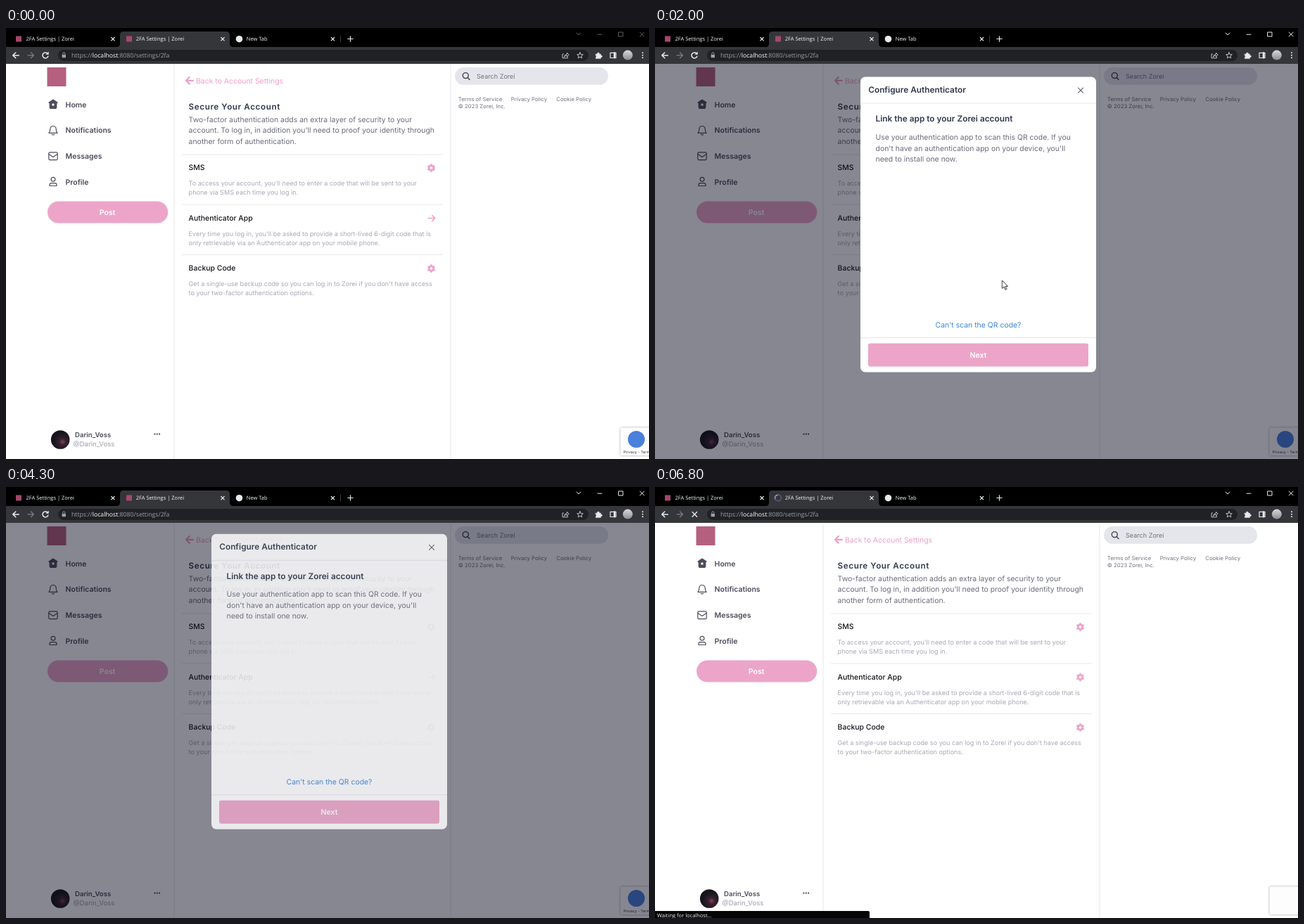
An HTML page for the animation above (6900 ms loop, 914x613 px).

```html
<!DOCTYPE html>
<html lang="en">
<head>
<meta charset="utf-8">
<title>2FA Settings</title>
<style>
html, body { margin: 0; width: 100%; height: 100%; overflow: hidden; background: #fff; }
svg { display: block; }
text { font: 400 10.44px Inter, sans-serif; fill: #6a6b7b; text-rendering: geometricPrecision; }
.ui { font: 400 7.5px "Open Sans", sans-serif; fill: #f4f5f7; }
.url { font-size: 8.72px; fill: #9aa0a6; }
.url tspan { fill: #fff; }
.head { font-size: 11.85px; font-weight: 600; fill: #30384c; }
.nav { font-size: 10.5px; font-weight: 600; fill: #4c4c5c; }
.row { font-weight: 500; fill: #15151d; }
.small { font-size: 9.08px; fill: #a7a7b6; }
.tiny { font-size: 7.75px; fill: #717180; }
.btn { font-size: 10.6px; font-weight: 600; fill: #fff; text-anchor: middle; }
.link { fill: #3b86dc; }
.line { fill: none; stroke: #e8e8ed; }
.icon { fill: none; stroke-linecap: round; stroke-linejoin: round; }
.pink { fill: #eca5c9; }
.pinkline { stroke: #eca0c6; }
.slate { stroke: #4c4c5c; stroke-width: 1.2; }
.chrome { stroke: #e8eaed; stroke-width: 1.2; }
.anim { opacity: 0; }
.spin { transform-box: fill-box; transform-origin: center; animation: spin .69s steps(7) infinite; }
@keyframes spin { to { transform: rotate(360deg); } }
</style>
</head>
<body>
<svg width="914" height="613" viewBox="0 0 914 613">
<defs>
  <radialGradient id="dark" cx=".62" cy=".62"><stop offset="0" stop-color="#8a3f4c"/><stop offset=".35" stop-color="#34222e"/><stop offset="1" stop-color="#15131c"/></radialGradient>
  <linearGradient id="pale" x2="0" y2="1"><stop stop-color="#d8d8da"/><stop offset="1" stop-color="#8f8c92"/></linearGradient>
  <filter id="shadow" x="-20%" y="-20%" width="140%" height="140%"><feDropShadow dx="0" dy="0" stdDeviation="1.8" flood-color="#777" flood-opacity=".8"/></filter>
  <g id="gear" fill="none" stroke="#eca0c6">
    <circle r="3.2" stroke-width="2.6"/>
    <circle r="4.8" stroke-width="2" pathLength="12" stroke-dasharray="1" stroke-dashoffset="1.5"/>
  </g>
  <path id="x" d="M-2.2-2.2 2.2 2.2M2.2-2.2-2.2 2.2"/>
  <g id="bar">
    <text class="head" x="303.2" y="92">Configure Authenticator</text>
    <path class="icon" d="M601.5 85.2l7 7m0-7l-7 7" stroke="#62636f" stroke-width="1.1"/>
    <path class="line" d="M292 107H627"/>
  </g>
</defs>

<!-- page -->
<rect y="51" width="914" height="562" fill="#fff"/>
<path class="line" d="M239 51V613M632 51V613" style="stroke:#eeeef2" stroke-width="1.4"/>
<rect x="58.5" y="56" width="27" height="27" fill="#b5607f"/>
<g class="icon slate">
  <path d="M61 106l6-4 6 4-1.2 1.2v5.6q0 1.6-1.6 1.6h-6.4q-1.6 0-1.6-1.6v-5.6z" fill="#4c4c5c"/>
  <circle cx="67" cy="109" r="1.8" fill="#fff" stroke="none"/>
  <path d="M61 149.3q1.8-1.6 1.8-5.6a4.2 4.2 0 0 1 8.4 0q0 4 1.8 5.6zM65.3 151.3q1.7 1.4 3.4 0"/>
  <rect x="60.8" y="176.8" width="12.4" height="10.8" rx="1.6"/><path d="M61 179.5l6 4 6-4"/>
  <circle cx="67" cy="215.3" r="2.9"/><path d="M62 224.5v-1.2q0-2.6 2.6-2.6h4.8q2.6 0 2.6 2.6v1.2z"/>
</g>
<text class="nav" x="84.6" y="112.8">Home</text>
<text class="nav" x="84.6" y="149.4">Notifications</text>
<text class="nav" x="84.6" y="186.1">Messages</text>
<text class="nav" x="84.6" y="222.7">Profile</text>
<rect class="pink" x="59" y="246.4" width="171.3" height="31.2" rx="15.6"/>
<text class="btn" x="144.2" y="265.9">Post</text>
<circle cx="77.2" cy="585.5" r="13.3" fill="url(#dark)"/>
<text class="nav" x="98" y="582.2" style="font-size:9.6px">Darin_Voss</text>
<text x="95.4" y="595.4" style="font-size:9.6px;fill:#9d9dab">@Darin_Voss</text>
<g fill="#3f3f4d"><circle cx="211.5" cy="577.6" r="1.1"/><circle cx="214.8" cy="577.6" r="1.1"/><circle cx="218.1" cy="577.6" r="1.1"/></g>

<path class="icon pinkline" d="M266 74.8H256.6M260.8 70l-4.8 4.8 4.8 4.8" stroke-width="2.2"/>
<text x="270" y="78.6" style="fill:#eca0c6">Back to Account Settings</text>
<text class="head" x="259.6" y="116.4" style="font-size:11.7px;letter-spacing:.58px">Secure Your Account</text>
<text x="259.6" y="133.7">Two-factor authentication adds an extra layer of security to your
  <tspan x="259.6" dy="15.7">account. To log in, in addition you'll need to proof your identity through</tspan>
  <tspan x="259.6" dy="15.7">another form of authentication.</tspan></text>
<path class="line" d="M250 180H621M250 251H621M250 322.5H621"/>
<text class="row" x="259.6" y="202.3">SMS</text>
<text class="small" x="259.6" y="224">To access your account, you'll need to enter a code that will be sent to your
  <tspan x="259.6" dy="13.1">phone via SMS each time you log in.</tspan></text>
<text class="row" x="259.6" y="273.8">Authenticator App</text>
<text class="small" x="259.6" y="295.5">Every time you log in, you'll be asked to provide a short-lived 6-digit code that is
  <tspan x="259.6" dy="13.1">only retrievable via an Authenticator app on your mobile phone.</tspan></text>
<text class="row" x="259.6" y="345.3">Backup Code</text>
<text class="small" x="259.6" y="367">Get a single-use backup code so you can log in to Zorei if you don't have access
  <tspan x="259.6" dy="13.1">to your two-factor authentication options.</tspan></text>
<use href="#gear" x="604.5" y="199"/>
<use href="#gear" x="604.5" y="342"/>
<path id="setup" class="icon pinkline" d="M600.3 270.5h9.4M605.8 266.5l4 4-4 4" stroke-width="1.5"/>
<use id="ready" class="anim" href="#gear" x="604.5" y="270.5"/>

<rect x="638" y="56" width="218" height="24.8" rx="12.4" fill="#e5e5ec"/>
<g class="icon" stroke="#3f3f4d" stroke-width="1.4"><circle cx="653.3" cy="67.6" r="4"/><path d="M656.4 70.8l2.6 2.6"/></g>
<text class="small" x="669" y="72.2" style="fill:#73737f">Search Zorei</text>
<text class="tiny" x="642.8" y="103.6">Terms of Service</text>
<text class="tiny" x="717.8" y="103.6">Privacy Policy</text>
<text class="tiny" x="782.3" y="103.6">Cookie Policy</text>
<text class="tiny" x="642.8" y="114.3">© 2023 Zorei, Inc.</text>
<rect x="873.5" y="568.5" width="60" height="39.5" rx="1.5" fill="#fdfdfd" filter="url(#shadow)"/>
<g id="badge">
  <circle cx="896" cy="585" r="12" fill="#4a7fdc"/>
  <text x="877.8" y="604.8" style="font-size:5.4px;fill:#333">Privacy - Terms</text>
</g>

<rect id="veil" class="anim" y="51" width="914" height="562" fill="#0a0c1e"/>

<!-- dialogs -->
<g id="intro" class="anim">
  <rect x="292" y="69.5" width="335" height="255" rx="7" fill="#fff"/>
  <use href="#bar"/>
  <text class="head" x="313.5" y="133.3">Protect your account in just two steps</text>
  <text x="324.8" y="158.8">1.<tspan x="336.6">Link an authentication app to your Zorei account</tspan></text>
  <text class="small" x="337" y="177.6">Use a compatible authentication app (like Norvia
    <tspan x="337" dy="13.1">Passgenerator, Kevro, etc.) We'll generate a QR code for you</tspan>
    <tspan x="337" dy="13.1">to scan.</tspan></text>
  <text x="324.8" y="229.4">2.<tspan x="336.6">Enter the confirmation code</tspan></text>
  <text class="small" x="337" y="248.2">Two-factor authentication will then be turned on for
    <tspan x="337" dy="13.1">authentication app, which you can turn off at any time.</tspan></text>
  <path class="line" d="M292 275.3H627"/>
  <rect x="303" y="283.5" width="313" height="33" rx="3" fill="#e7a2c4"/>
  <text class="btn" x="459.5" y="303.9">Get Started</text>
</g>

<g id="scan" class="anim">
  <rect x="292" y="69.5" width="335" height="420" rx="7" fill="#fff"/>
  <use href="#bar"/>
  <text class="head" x="313.5" y="133.3">Link the app to your Zorei account</text>
  <text x="313.5" y="158.8">Use your authentication app to scan this QR code. If you
    <tspan x="313.5" dy="15.7">don't have an authentication app on your device, you'll</tspan>
    <tspan x="313.5" dy="15.7">need to install one now.</tspan></text>
  <text class="link" x="459.5" y="425.8" text-anchor="middle">Can't scan the QR code?</text>
  <path class="line" d="M292 440.5H627"/>
  <rect class="pink" x="303" y="448.5" width="313" height="33" rx="3"/>
  <text class="btn" x="459.5" y="468.9">Next</text>
</g>

<g id="manual" class="anim">
  <rect x="292" y="69.5" width="335" height="253" rx="7" fill="#fff"/>
  <use href="#bar"/>
  <text class="head" x="313.5" y="133.3">Can’t scan the QR code?</text>
  <text x="313.5" y="158.8">If you can’t scan the QR code with your camera, enter the
    <tspan x="313.5" dy="15.7">following code into the authentication app to link it to your</tspan>
    <tspan x="313.5" dy="15.7">Zorei account.</tspan></text>
  <rect x="313.5" y="202" width="292" height="36.7" fill="#e5e7ec"/>
  <text x="459.5" y="224.2" text-anchor="middle" style="font-weight:600;fill:#20222c">R7QRGPRC7MK77FQL354QLF6QG4QMHUEG</text>
  <text class="link" x="313.8" y="258.4" text-decoration="underline">Try to scan the QR code again</text>
  <path class="line" d="M292 273H627"/>
  <rect class="pink" x="303" y="281.3" width="313" height="32.6" rx="3"/>
  <text class="btn" x="459.5" y="301.6">Next</text>
</g>

<g id="done" class="anim">
  <rect x="292" y="69.5" width="335" height="310" rx="7" fill="#fff"/>
  <use href="#bar"/>
  <text class="head" x="313.5" y="133.3">You're all set!</text>
  <text x="313.5" y="158.8">Now you can use the mobile authentication app to get an
    <tspan x="313.5" dy="15.7">authentication code any time you log in to Zorei.</tspan>
    <tspan x="313.5" dy="23.5">Save this single-use backup code in a safe place.</tspan>
    <tspan x="313.5" dy="23.6">B(I&gt;e;RDB2o&lt;^vL@Y4</tspan>
    <tspan x="313.5" dy="23.6">This backup code lets you log in to Zorei if you don't have</tspan>
    <tspan x="313.5" dy="15.7">access to any of your other two-factor authentication</tspan>
    <tspan x="313.5" dy="15.7">methods.</tspan></text>
  <path class="line" d="M292 291.3H627"/>
  <rect class="pink" x="303" y="299.2" width="313" height="32.8" rx="3"/>
  <text class="btn" x="459.5" y="319.6">Done</text>
  <rect x="303.7" y="338.3" width="311.6" height="32.6" rx="3" fill="#fff" stroke="#d9d9e0" stroke-width="1.4"/>
  <text class="btn" x="459.5" y="358.2" style="fill:#4c4c5c">Get Backup Code</text>
</g>

<!-- browser -->
<rect width="914" height="27" fill="#000"/>
<rect y="27" width="914" height="24" fill="#35363a"/>
<path d="M157 27q5 0 5-5V10q0-5 5-5H313q5 0 5 5V22q0 5 5 5z" fill="#35363a"/>
<rect x="74" y="31" width="754" height="16" rx="8" fill="#202124"/>
<rect x="14" y="11.5" width="8" height="8" fill="#a3486d"/>
<rect id="favicon" x="171" y="11.5" width="8" height="8" fill="#a3486d"/>
<circle cx="331.5" cy="15.7" r="4.8" fill="#e8eaed"/>
<text class="ui" x="28.5" y="18.3">2FA Settings | Zorei</text>
<text class="ui" x="184.8" y="18.3">2FA Settings | Zorei</text>
<text class="ui" x="341.8" y="18.3">New Tab</text>
<g class="icon chrome">
  <use href="#x" x="152" y="15.7"/><use href="#x" x="308" y="15.7"/><use href="#x" x="464.5" y="15.7"/>
  <path d="M485.8 15.5h7.4M489.5 11.8v7.4"/>
  <path d="M475.5 11v9" stroke="#4a4b4f" stroke-width=".8"/>
  <path d="M18.3 38.9h-8M13.8 35l-4 3.9 4 3.9" stroke-width="1.5"/>
  <path d="M31 38.9h8M35.5 35l4 3.9-4 3.9" stroke="#7d7f83"/>
  <g id="reload"><path d="M59.8 40.3a4 4 0 1 1-.9-4.2" stroke-width="1.5"/><path d="M60.4 34.4v3h-3z" fill="#e8eaed" stroke-width=".6"/></g>
  <path id="stop" class="anim" d="M53 35.6l6.6 6.6m0-6.6l-6.6 6.6" stroke-width="1.4"/>
  <path d="M80.8 38v-1.6a1.5 1.5 0 0 1 3 0V38" stroke="#9aa0a6" stroke-width="1"/>
  <rect x="79.6" y="38" width="5.4" height="4.2" rx=".6" fill="#9aa0a6" stroke="none"/>
  <g stroke="#bdc1c6" stroke-width="1">
    <path d="M792.5 37H791v5.8h7.4v-1.4M793.5 41q.6-3.6 4-3.8v-1.9l2.6 2.8-2.6 2.8v-1.8q-2.3-.2-4 1.9z"/>
    <path d="M816 34.7l1.2 2.9 3.1.2-2.4 2 .8 3.1-2.7-1.7-2.7 1.7.8-3.1-2.4-2 3.1-.2z"/>
  </g>
  <path d="M838.3 37h2.3a1.4 1.4 0 1 1 2.6 0h2.3v2.1a1.4 1.4 0 1 1 0 2.5v2h-7.2v-2a1.4 1.4 0 0 0 0-2.6z" fill="#e8eaed" stroke-width=".4"/>
  <rect x="859" y="35.3" width="8" height="7.2"/><path d="M865 35.5v6.8" stroke-width="2.6"/>
  <g id="win" stroke-width="1"><path d="M811 7l3 3 3-3M841 9.2h6"/><rect x="871" y="6" width="6" height="6"/><path d="M901.2 6l6 6m0-6l-6 6"/></g>
</g>
<circle cx="883.8" cy="38.6" r="7" fill="url(#pale)"/>
<g fill="#e8eaed"><circle cx="905" cy="35.3" r="1"/><circle cx="905" cy="38.8" r="1"/><circle cx="905" cy="42.3" r="1"/></g>
<text class="ui url" x="93" y="42">https://<tspan>localhost</tspan>:8080/settings/2fa</text>

<g id="loading" class="anim">
  <g class="spin icon" stroke-width="1.4"><circle cx="175" cy="15.5" r="4.4" stroke="#5b6488"/><path d="M175 11.1a4.4 4.4 0 0 1 4.4 4.4" stroke="#a9b8ee"/></g>
  <path d="M0 603H303q2 0 2 2V613H0z" fill="#050506"/>
  <text class="ui" x="3" y="612.4">Waiting for localhost...</text>
</g>

<g id="cursor" class="anim" fill="#fff" stroke="#111" stroke-width=".9" stroke-linejoin="round">
  <path id="arrow" d="M0 0V11.5L2.7 9 4.6 13.2 6.4 12.4 4.6 8.4H8z"/>
  <path id="hand" class="anim" d="M-1.1 1Q0-.8 1.2 1V5.2q1.2-1 2.1.2 1.2-.8 2 .3 1.6-.6 1.9.9v3.2q0 1.6-1 3V14H-.2v-1.2Q-2.4 10.6-3.6 8q.4-1.6 2.5.4z"/>
</g>
</svg>

<script>
const LOOP = 6900, FRAME = 100;

// keys: [ms, style]; motion between two keys is held for each 100 ms
function play(id, keys) {
  const all = [...keys, [LOOP, keys.at(-1)[1]]];
  const frames = all.map(([ms, style], i) => {
    const next = i + 1 < all.length ? all[i + 1][0] : LOOP;
    const count = Math.max(1, Math.round((next - ms) / FRAME));
    return { offset: Math.max(0, ms - 1) / LOOP, easing: `steps(${count}, end)`, ...style };
  });
  document.getElementById(id).animate(frames, { duration: LOOP, iterations: Infinity });
}

const fade = (id, ...keys) => play(id, keys.map(([ms, opacity]) => [ms, { opacity }]));

// flips between hidden and shown at each given time
function toggle(id, shown, ...times) {
  let on = +shown;
  const keys = [[0, on]];
  for (const t of times) {
    keys.push([t - FRAME, on]);
    on = 1 - on;
    keys.push([t, on]);
  }
  fade(id, ...keys);
}

// fades and slides down on entry, back up on exit
function dialog(id, ...spans) {
  const keys = [[0, 0]];
  for (const [enter, exit] of spans) {
    keys.push([enter - 100, 0], [enter, .17], [enter + 200, .83], [enter + 300, 1],
              [exit - 100, 1], [exit, .87], [exit + 200, .2], [exit + 300, 0]);
  }
  play(id, keys.map(([ms, o]) => [ms, { opacity: o, transform: `translate(0px, ${(o - 1) * 16}px)` }]));
}

dialog('intro', [900, 1500]);
dialog('scan', [1700, 2700], [4100, 5100]);
dialog('manual', [2900, 3700]);
dialog('done', [5400, 6200]);

fade('veil', [0, 0], [700, 0], [800, .17], [1000, .49], [6200, .49], [6500, 0]);
fade('win', [0, .4], [700, .4], [800, 1]);
toggle('setup', true, 6500);
toggle('ready', false, 6500);
toggle('reload', true, 6500);
toggle('stop', false, 6500);
toggle('favicon', true, 6500);
toggle('loading', false, 6500);
toggle('badge', true, 6600);

toggle('cursor', false, 400, 4000, 5900, 6500);
toggle('hand', false, 700, 1600, 2400, 2800, 6100, 6300);
toggle('arrow', true, 700, 1600, 2400, 2800, 6100, 6300);
const path = [[0, 650, 350], [400, 650, 350], [800, 605, 268], [900, 605, 268], [1300, 500, 307],
  [1500, 500, 307], [2000, 493.5, 359], [2200, 493.5, 359], [2400, 460, 419], [2700, 460, 419],
  [3500, 452, 241], [4000, 452, 241], [5900, 500, 350], [6100, 470, 312]];
play('cursor', path.map(([ms, x, y]) => [ms, { transform: `translate(${x}px, ${y}px)` }]));
</script>
</body>
</html>
```
